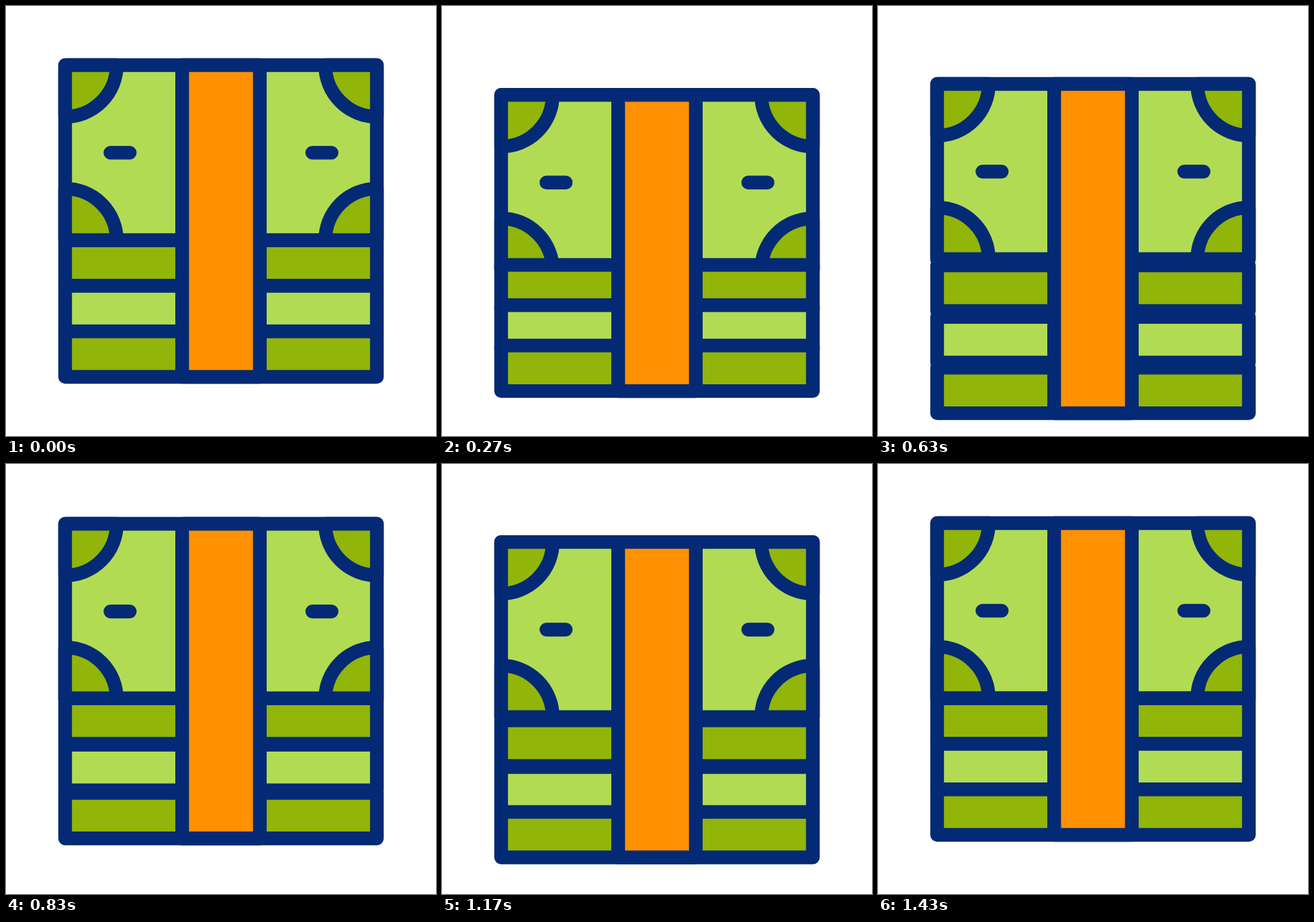
An HTML page that plays this animation: 640 by 640 pixels, repeating every 2 s.

```html
<!DOCTYPE html>
<html lang="en">
<head>
<meta charset="utf-8">
<title>Bouncing banknotes</title>
<style>
  html, body { margin: 0; height: 100%; overflow: hidden; background: #fff; }
  svg { display: block; width: 100vw; height: 100vh; }
  svg * { stroke: #042a75; stroke-width: 20.4; stroke-linejoin: round; stroke-linecap: round; }
  .light { fill: #b2db54; }
  .dark { fill: #91b508; }
  .orange { fill: #ff9103; }
</style>
</head>
<body>
<svg viewBox="0 0 640 640">
  <g class="layer">
    <rect class="light" x="88" y="88" width="464" height="260.7"/>
    <path class="dark" d="M88 88H164.8A76.8 76.8 0 0 1 88 164.8Z
      M552 88V164.8A76.8 76.8 0 0 1 475.2 88Z
      M88 348.7V271.9A76.8 76.8 0 0 1 164.8 348.7Z
      M552 348.7H475.2A76.8 76.8 0 0 1 552 271.9Z"/>
    <path d="M155.4 218.4H184.2M455.8 218.4H484.6"/>
  </g>
  <rect class="layer dark" x="88" y="348.7" width="464" height="67.8"/>
  <rect class="layer light" x="88" y="416.5" width="464" height="67.8"/>
  <rect class="layer dark" x="88" y="484.3" width="464" height="67.7"/>
  <rect id="band" class="orange" x="262.2" width="115.6"/>
</svg>
<script>
  const LOOP = 2000, FPS = 30;
  // [tick, vertical offset] for the top layer; each lower layer lags one tick
  const keys = [[0, 0], [13, 65.4], [24, 0], [33, 34.6], [40, 0]];
  const layers = document.querySelectorAll('.layer');
  const band = document.getElementById('band');

  function offsetAt(tick) {
    if (tick <= 0) return 0;
    const next = keys.findIndex(([end]) => tick <= end);
    if (next < 0) return 0;
    const [start, from] = keys[next - 1], [end, to] = keys[next];
    const eased = (1 - Math.cos(Math.PI * (tick - start) / (end - start))) / 2;
    return from + (to - from) * eased;
  }

  function draw(now) {
    const tick = Math.floor((now % LOOP + 5) * FPS / 1000);
    layers.forEach((layer, lag) =>
      layer.setAttribute('transform', `translate(0 ${offsetAt(tick - lag)})`));
    const top = 88 + offsetAt(tick), bottom = 552 + offsetAt(tick - 3);
    band.setAttribute('y', top);
    band.setAttribute('height', bottom - top);
  }

  let begin;
  function loop(now) {
    begin ??= now;
    draw(now - begin);
    requestAnimationFrame(loop);
  }
  draw(0);
  requestAnimationFrame(loop);
</script>
</body>
</html>
```
